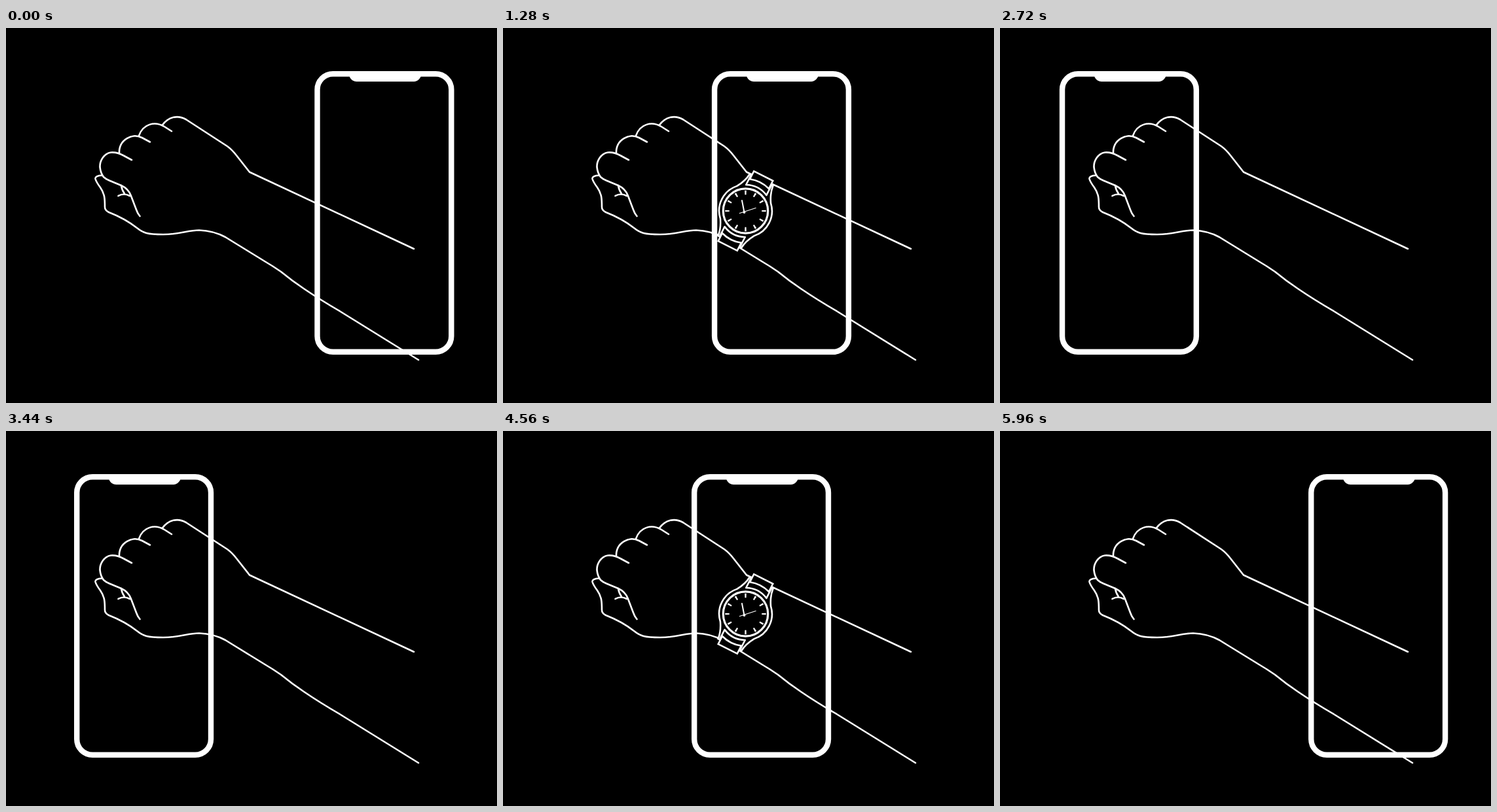
These frames come from a looping animation (750x574 px, 6040 ms). An HTML page:

```html
<!DOCTYPE html>
<html lang="en">
<head>
<meta charset="utf-8">
<title>Watch try-on</title>
<style>
  html, body { margin: 0; width: 100%; height: 100%; overflow: hidden; background: #000; }
  svg { display: block; width: 750px; height: 574px; }
  .line { fill: none; stroke: #fff; stroke-width: 2.6; stroke-linecap: round; stroke-linejoin: round; }
  .solid { fill: #000; stroke-linejoin: miter; }
  .ticks { stroke-width: 6.5; stroke-linecap: butt; }
</style>
</head>
<body>
<svg viewBox="0 0 750 574">
  <defs>
    <clipPath id="screen">
      <rect class="slide" x="4" y="70" width="205" height="426" rx="24"/>
    </clipPath>
    <!-- one end of the strap: lugs, case edge, then the link -->
    <g id="strap">
      <path d="M-17.5-53V-36A40 40 0 0 1 17.5-36V-53"/>
      <path class="solid" d="M-16.3-60H16.3V-46.5Q0-52-16.3-46.5Z"/>
    </g>
  </defs>

  <g class="line">
    <!-- forearm and back of the hand -->
    <path d="M623 338L372 220.5L352 195Q345 186 338 181L275 140C262 132.5 248 136 238.5 149"/>
    <!-- knuckles -->
    <path d="M253 158L242 151C227 142 209 147 203 165"/>
    <path d="M220 174.5L208 168C193 160 172 171 173 192"/>
    <path d="M192 202L180 195.5C172 191 165 190 160 190.5C150 192 143 203 143.5 213Q144.5 222 149 228Q152 231 158 233.5L176 241Q187 246 191 257L199 278Q201 284 204.5 288"/>
    <path d="M176 241Q177 248 181 253.5M171.5 257Q180 252 189 257"/>
    <!-- thumb and underside of the arm -->
    <path d="M147 225.5Q136 226 136.5 231Q138 236 144 244C151 254 151 262 151 274Q151 279 157 282C175 289 186 295 200 306C210 314 216 316 240 316C265 316 278 309.5 295 309.5C309 310 322 313 335 320L395 357Q407 364 420 373Q437 387 455 399Q480 416 510 433.5L630 508"/>
  </g>

  <g clip-path="url(#screen)">
    <g class="line" transform="translate(370.5 280)">
      <g transform="rotate(27)">
        <path class="solid" d="M-20-53Q-21-41-29-28A40 40 0 0 0-29 28Q-21 41-20 53H20Q21 41 29 28A40 40 0 0 0 29-28Q21-41 20-53Z"/>
        <use href="#strap"/>
        <use href="#strap" transform="scale(1 -1)"/>
      </g>
      <circle r="34.2" style="stroke-width:3.2"/>
      <circle class="ticks" r="28" pathLength="360" stroke-dasharray="5 25" stroke-dashoffset="2.5"/>
      <path d="M-2 2L-5.5-16" style="stroke-width:2"/>
      <path d="M-9 3.5L15.5-4.5" style="stroke-width:1.3"/>
      <circle cx="-2" cy="2" r="2" fill="#fff" stroke="none"/>
    </g>
  </g>

  <g class="slide">
    <rect x="4.1" y="70.2" width="204.8" height="425.6" rx="24" fill="none" stroke="#fff" stroke-width="8.4"/>
    <path d="M53.5 72H162V75Q158 82 152 82H64Q57 82 53.5 75Z" fill="#fff"/>
  </g>
</svg>
<script>
  const LOOP = 6040, STEP = 40, LAST = 5960, HALF = 3000;
  const RIGHT = 471.4, TRAVEL = 390;
  const sliders = document.querySelectorAll('.slide');
  const ease = u => u * u * (3 - 2 * u);

  // The slide moves in 40 ms steps, so the eased curve is sampled here.
  function draw(now) {
    const t = Math.min(Math.floor((now % LOOP) / STEP) * STEP, LAST);
    const u = t < HALF ? t / HALF : 2 - t / HALF;
    const x = RIGHT - TRAVEL * ease(u);
    for (const el of sliders) el.setAttribute('transform', `translate(${x.toFixed(2)} 0)`);
    requestAnimationFrame(draw);
  }
  draw(0);
</script>
</body>
</html>
```
